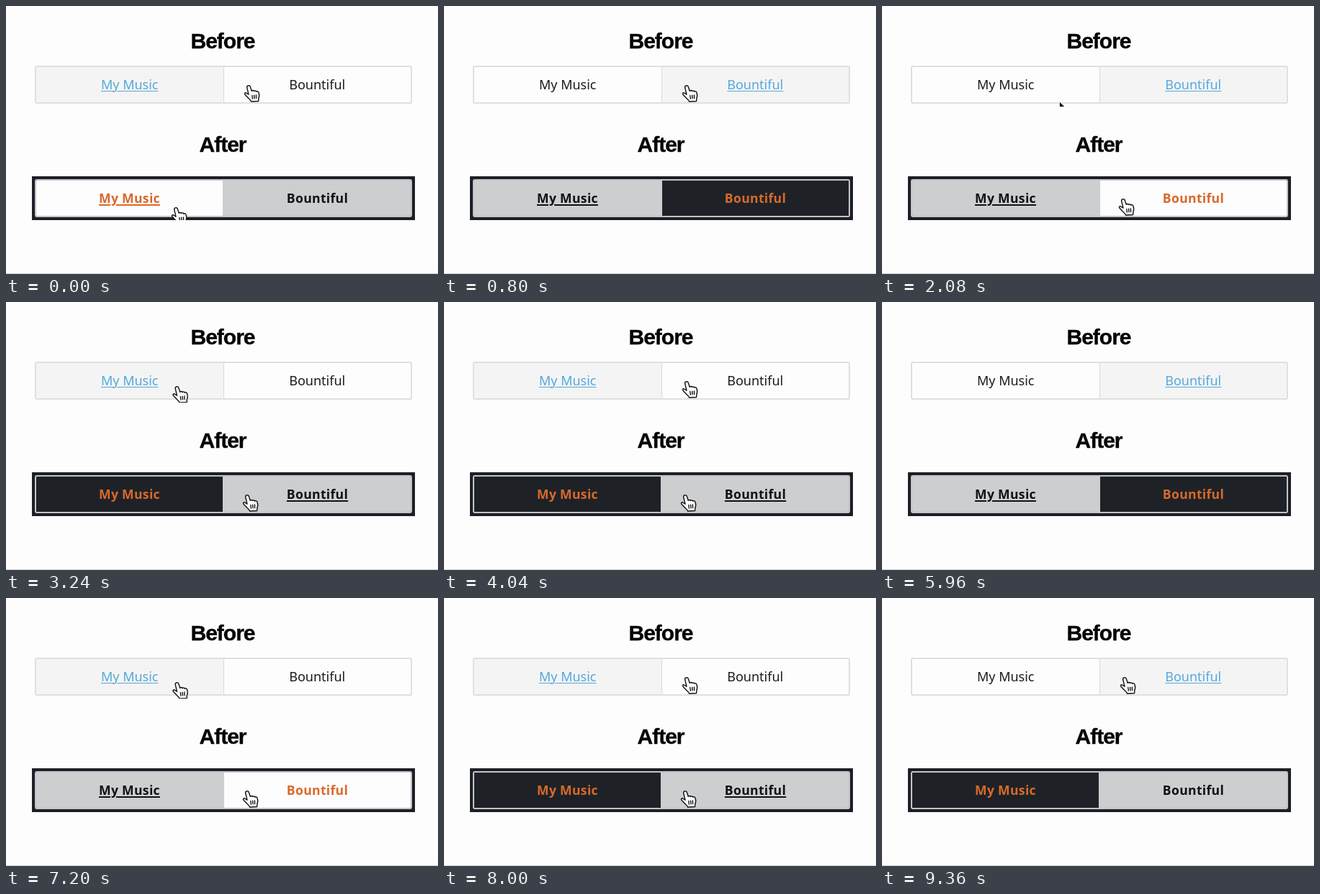
Write an HTML page that moves like this. It is 600 px wide and 373 px high and loops after 9400 ms.

```html
<!DOCTYPE html>
<html lang="en">
<head>
<meta charset="utf-8">
<title>Before and after</title>
<style>
  html, body { margin: 0; width: 100%; height: 100%; overflow: hidden; background: #fdfdfd; }
  .stage { position: relative; width: 600px; height: 373px; overflow: hidden; }
  .stage::after { content: ""; position: absolute; left: 0; right: 0; bottom: 0; height: 1px; background: #d4d4d4; }
  h2 {
    position: absolute; left: 1px; width: 600px; margin: 0; text-align: center;
    font: bold 30px/36px "Liberation Sans", Arial, sans-serif; letter-spacing: -1px;
    color: #050505; -webkit-text-stroke: .4px #050505;
  }
  .tabs {
    position: absolute; left: 40px; width: 524px; height: 53px; box-sizing: border-box;
    display: flex; border: 2px solid #e0e0e1; border-radius: 3px; overflow: hidden;
    font: 18px/49px "Noto Sans", "Open Sans", sans-serif;
  }
  .tab { flex: 1; text-align: center; text-decoration-thickness: 1.4px; text-underline-offset: 2px; }
  .line { text-decoration-line: underline; }

  #before { top: 83px; color: #1c1c1e; }
  #before .tab + .tab { border-left: 1px solid #d9d9da; }
  #before .on { background: #f4f4f4; color: #55a9dc; }

  .frame { position: absolute; left: 36px; top: 237px; width: 532px; height: 61px; background: #1c1f27; }
  #after { top: 241px; border-color: #c3c4c7; font-weight: 600; font-size: 17.6px; letter-spacing: .3px; }
  #after .tab { background: #1e2227; color: #d9692b; text-decoration-thickness: 1.6px; }
  #after .tab + .tab { border-left: 2px solid #cdced0; }
  #after .hover { background: #fdfdfd; }
  #after .on { background: #cdced0; color: #111216; }

  svg { position: absolute; left: 0; top: 0; }
</style>
</head>
<body>
<div class="stage">
  <h2 style="top:31px">Before</h2>
  <div class="tabs" id="before"><div class="tab">My Music</div><div class="tab">Bountiful</div></div>
  <h2 style="top:175px">After</h2>
  <div class="frame"></div>
  <div class="tabs" id="after"><div class="tab">My Music</div><div class="tab">Bountiful</div></div>
  <svg width="600" height="373">
    <defs>
      <clipPath id="top"><rect width="600" height="140"/></clipPath>
      <clipPath id="low"><rect width="600" height="298"/></clipPath>
      <g id="hand" transform="translate(-1)" stroke="#111" stroke-width="1.4" stroke-linejoin="round" stroke-linecap="round">
        <path fill="#fff" d="M6 1C7.5.2 8.8 1 9.3 2.5L11.2 8.2C12 7.2 13.8 7.3 14.4 8.4C15.4 7.6 17.2 7.8 17.6 9C18.8 8.4 20.6 9 21 10.5C21.8 13 22 16 20.8 18.6L20.6 22.5L10.6 23C10 20.8 6 18 2.2 13.5C.6 11.8 2 10.3 3.6 11L7 13.2L4.8 4C4.4 2.6 4.8 1.5 6 1Z"/>
        <path fill="none" d="M11.8 14.5L12.4 19M14.6 14.3L15 18.8M17.4 14L17.6 18.5"/>
      </g>
      <path id="arrow" fill="#0a0a0a" stroke="#fff" stroke-width=".8" d="M0 0V15L3.5 11.8L6 17.5L8.4 16.5L6 10.8H10.8Z"/>
    </defs>
    <g clip-path="url(#top)"><use id="topCursor" href="#hand"/></g>
    <g clip-path="url(#low)"><use id="lowCursor" href="#hand"/></g>
  </svg>
</div>
<script>
const LOOP = 9400, BEFORE_CYCLE = 3920, AFTER_CYCLE = 5100;
const LEFT = 0, RIGHT = 1, NONE = -1;

// Steps: [time, value]
const beforeOn = [[0, LEFT], [240, RIGHT], [2500, LEFT]];
const afterOn = [[0, RIGHT], [240, LEFT], [2500, RIGHT]];
const afterHover = [[0, LEFT], [240, NONE], [1780, RIGHT], [2500, NONE], [4480, LEFT]];
const afterLine = [[0, LEFT], [2820, RIGHT], [4060, NONE], [4760, LEFT]];

// Paths: [time, x, y]
const topPath = [
  [0, 331, 110], [1600, 331, 110], [1680, 320, 142], [2050, 252, 142],
  [2080, 246.5, 133], [2240, 231.5, 117], [3480, 231.5, 117], [3840, 331, 110]
];
const lowPath = [
  [0, 230, 280], [450, 230, 280], [600, 234, 300], [1700, 326, 300],
  [1860, 329, 268], [4120, 329, 268], [4121, 329, 300], [4560, 230, 300],
  [4640, 230, 286], [4780, 230, 280]
];

const $ = id => document.getElementById(id);
const beforeTabs = [...$("before").children];
const afterTabs = [...$("after").children];

const stepAt = (steps, t) => steps.filter(s => s[0] <= t).pop()[1];

function mark(tabs, name, index) {
  tabs.forEach((tab, i) => tab.classList.toggle(name, i === index));
}

function place(cursor, path, t) {
  const next = path.findIndex(p => p[0] > t);
  const b = path[next < 0 ? path.length - 1 : next];
  const a = next < 0 ? b : path[next - 1];
  const k = a === b ? 0 : (t - a[0]) / (b[0] - a[0]);
  const e = k * k * (3 - 2 * k);
  const x = a[1] + (b[1] - a[1]) * e, y = a[2] + (b[2] - a[2]) * e;
  cursor.setAttribute("transform", `translate(${x} ${y})`);
}

function draw() {
  const t = performance.now() % LOOP;
  const tb = t % BEFORE_CYCLE, ta = t % AFTER_CYCLE;

  const on = stepAt(beforeOn, tb);
  mark(beforeTabs, "on", on);
  mark(beforeTabs, "line", on);
  mark(afterTabs, "on", stepAt(afterOn, ta));
  mark(afterTabs, "hover", stepAt(afterHover, ta));
  mark(afterTabs, "line", stepAt(afterLine, ta));

  $("topCursor").setAttribute("href", tb > 1680 && tb < 2130 ? "#arrow" : "#hand");
  place($("topCursor"), topPath, tb);
  place($("lowCursor"), lowPath, ta);
  requestAnimationFrame(draw);
}
draw();
</script>
</body>
</html>
```
